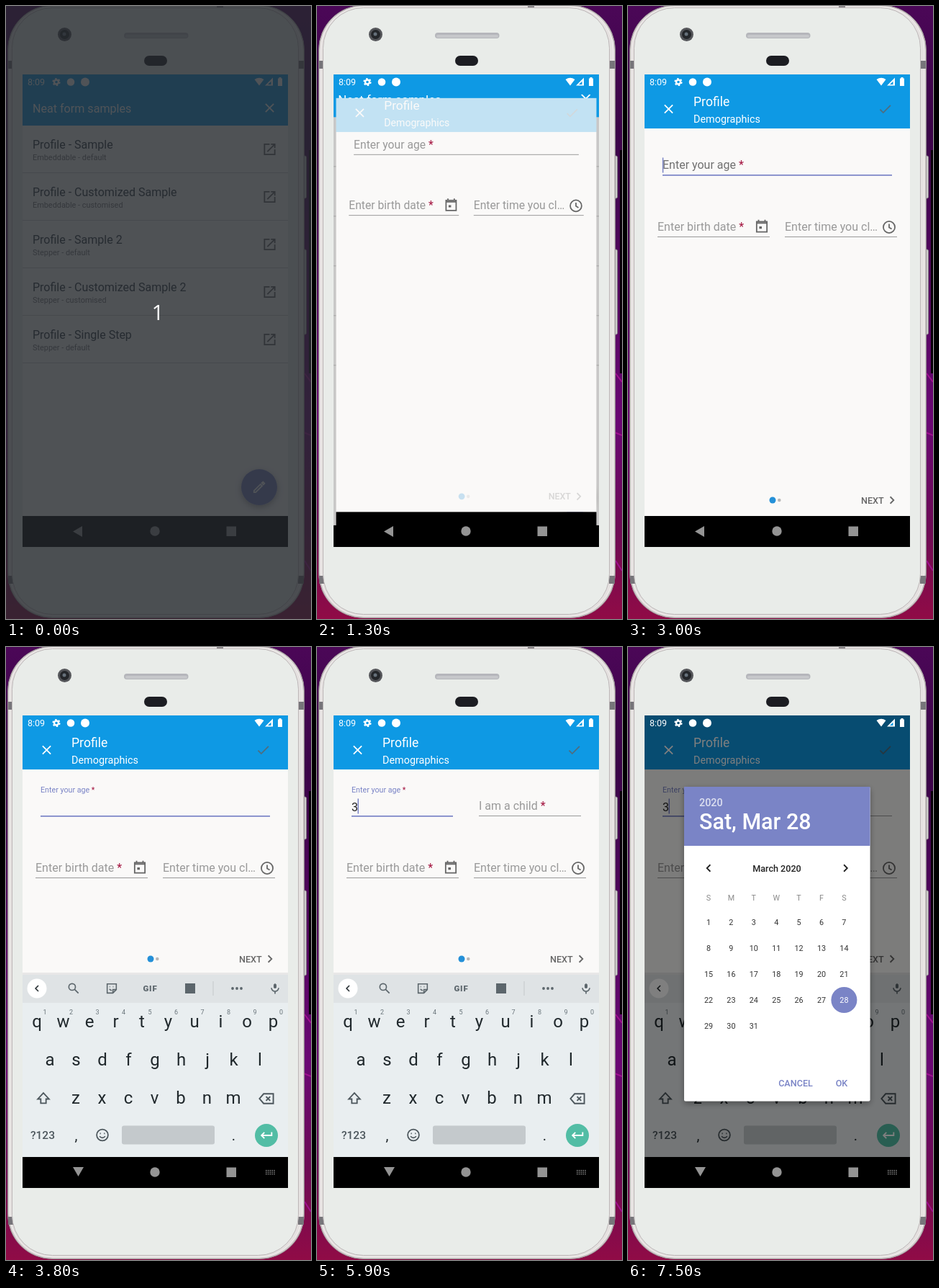
Animation, 424 px wide and 851 px high, one loop 8000 ms. Source, as an HTML page:

```html
<!DOCTYPE html>
<html lang="en">
<head>
<meta charset="utf-8">
<title>Form sample on a phone</title>
<style>
html, body { margin: 0; width: 100%; height: 100%; overflow: hidden; background: #000; }
svg { display: block; width: 424px; height: 851px; }
text { font-family: Roboto, sans-serif; white-space: pre; }
</style>
</head>
<body>
<svg id="stage" viewBox="0 0 424 851"></svg>
<script>
const BLUE = '#0e99e4', INDIGO = '#7a84c6', PAPER = '#faf9f8', GREY = '#666', HINT = '#999', STAR = '#a3133f', KEY = '#20282c';

const rect = (x, y, w, h, fill, extra = '') => `<rect x="${x}" y="${y}" width="${w}" height="${h}" fill="${fill}" ${extra}/>`;
const circle = (x, y, r, fill, extra = '') => `<circle cx="${x}" cy="${y}" r="${r}" fill="${fill}" ${extra}/>`;
const text = (s, x, y, size, fill, extra = '') => `<text x="${x}" y="${y}" font-size="${size}" fill="${fill}" ${extra}>${s}</text>`;
const centred = (s, x, y, size, fill, extra = '') => text(s, x, y, size, fill, `text-anchor="middle" ${extra}`);
const group = (id, body, extra = '') => `<g id="${id}" ${extra}>${body}</g>`;
const required = label => `${label} <tspan fill="${STAR}">*</tspan>`;
const MEDIUM = 'font-weight="500"';

// Line icons on a 24-unit grid, centred on x, y
const ICONS = {
  open: 'M12 4H4v16h16v-8M14 4h6v6M20 4L8.5 15.5',
  close: 'M5.7 5.7l12.6 12.6M18.3 5.7L5.7 18.3',
  check: 'M4.1 12.7L9 17.6L20.3 6.3',
  right: 'M9.3 6.7l5.3 5.3l-5.3 5.3',
  left: 'M14.7 6.7l-5.3 5.3l5.3 5.3',
  pencil: 'M4 20v-2.5L14 7.5l2.5 2.5L6.5 20zM16 5.5l2-1.6 2.2 2.2-1.7 2z',
  calendar: 'M4 4h16v16H4zM4 6.3h16M7 1v3M17 1v3M8 12.5h4M8 14h4',
  clock: 'M3 12a9 9 0 1 0 18 0a9 9 0 1 0-18 0M12 7v5.5l4 2.4',
  search: 'M4 9.5a5.5 5.5 0 1 0 11 0a5.5 5.5 0 1 0-11 0M14 14l6 6',
  sticker: 'M4 4h16v10l-6 6H4zM14 20v-6h6M8 9h1M14 9h1M8 13q2 3 4 2',
  mic: 'M12 4v8M10.6 5v6M13.4 5v6M6 11a6 6 0 0 0 12 0M12 17v4',
  shift: 'M12 3.5l8.5 9H16V19H8v-6.500H3.500z',
  erase: 'M8 5h14v14H8l-6-7zM11.500 9l6 6M17.500 9l-6 6',
  smile: 'M3 12a9 9 0 1 0 18 0a9 9 0 1 0-18 0M8 9.500h1.500M14.500 9.500H16M7.500 14q4.500 5 9 0',
  enter: 'M20 7v5H5M9 7.500L4.500 12L9 16.500'
};
const icon = (name, x, y, color, size = 21.5, weight = 2) =>
  `<path d="${ICONS[name]}" transform="translate(${x - size / 2} ${y - size / 2}) scale(${size / 24})" fill="none" stroke="${color}" stroke-width="${weight}"/>`;

function phone() {
  const side = (x, y) => rect(x, y, 8, 11, '#77757a');
  return rect(0, 0, 424, 851, 'url(#wall)') + rect(421, 200, 3, 310, '#080008') +
    '<path d="M415 510L424 522M414 592L424 596M415 770l9 14" stroke="#a0108f" stroke-width="2"/>' +
    rect(412, 208, 5.5, 59, '#cfcccd', 'rx="2" stroke="#8d898c"') + rect(412, 338, 5.5, 118, '#cfcccd', 'rx="2" stroke="#8d898c"') +
    rect(2.500, -1, 412, 850.500, '#d3cdcd', 'rx="62" stroke="#9a9496"') +
    rect(5, 1, 407, 846, '#e5e1e0', 'rx="60" stroke="#f6f3f2"') +
    side(3, 76) + side(406, 76) + side(3, 791) + side(406, 791) + rect(293, 0, 9, 3, '#8c888b') +
    rect(8.500, 2.500, 398, 842, '#e9ece9', 'rx="56" stroke="#bdb7b8"') +
    circle(81.500, 39.500, 9.500, '#55565a') + circle(81.500, 39.500, 6.500, '#24262a') + circle(81, 39, 2.500, '#66707a') +
    rect(164, 37, 89.500, 8, '#b5b6bb', 'rx="4"') + rect(166, 40, 86, 4, '#c6c7ca', 'rx="2"') +
    rect(192, 69, 32, 14, '#1c1d22', 'rx="7"');
}

function listPage() {
  const rows = [
    ['Sample', 'Embeddable - default'], ['Customized Sample', 'Embeddable - customised'],
    ['Sample 2', 'Stepper - default'], ['Customized Sample 2', 'Stepper - customised'], ['Single Step', 'Stepper - default']
  ];
  return rect(23, 95, 369, 613, PAPER) + rect(23, 95, 369, 71, BLUE) + rect(23, 708, 369, 43, '#000') +
    text('Neat form samples', 37, 148, 16.1, '#fff') + icon('close', 366.500, 141.500, '#fff') +
    rows.map(([name, kind], i) => {
      const y = 166 + 66 * i;
      return text('Profile - ' + name, 37, y + 32, 16, '#2b363d') + text(kind, 37, y + 48, 10.9, '#757575') +
        icon('open', 366.500, y + 33, GREY) + rect(23, y + 65, 369, 1, '#cfcfce');
    }).join('') +
    circle(352, 668, 25, INDIGO, 'filter="url(#lift)"') + icon('pencil', 352, 668, '#fff') +
    rect(23, 166, 369, 542, '#000', 'id="listDim"');
}

function formPage() {
  const bar = rect(23, 122, 369, 48, BLUE) + text('Profile', 91, 138.500, 17.6, '#fff') +
    text('Demographics', 91, 162, 14.4, '#fff') + icon('close', 56.500, 143, '#fff') + icon('check', 357.500, 143, '#4d6d80');
  const fields = text(required('Enter your age'), 48, 226, 16, HINT, 'id="age"') + rect(48, 234, 319, 1, HINT, 'id="ageLine"') +
    group('child', text(required('I am a child'), 225, 226, 16, HINT) + rect(225, 234, 142, 1, HINT)) +
    text('3', 48, 227.500, 16, '#222', 'id="digit"') + rect(48, 210.500, 1.500, 21, INDIGO, 'id="cursor"') +
    text(required('Enter birth date'), 41, 312, 16, HINT) + rect(41, 320, 156, 1, HINT) + icon('calendar', 186, 306.500, GREY) +
    text('Enter time you cl…', 218, 312, 16, HINT) + rect(218, 320, 156, 1, HINT) + icon('clock', 363, 307, GREY);
  const pager = circle(201, 686, 4.500, '#2490d8') + circle(210.300, 686, 2.300, '#b8b8b8') +
    text('NEXT', 324, 690.500, 12.600, GREY, MEDIUM) + icon('right', 367, 686, GREY);
  return rect(23, 122, 369, 586, PAPER) + rect(23, 708, 369, 43, '#000') +
    group('bar', bar) + group('fields', fields) + group('pager', pager);
}

function keyboard() {
  const row = (keys, x, y) => [...keys].map((k, i) => centred(k, x + 36.500 * i, y, 24, KEY)).join('');
  const tool = '#5c666c';
  return rect(23, 452, 369, 3, '#000', 'opacity=".07"') + rect(23, 455, 369, 39, '#dfe3e5') + rect(23, 494, 369, 214, '#e9eef0') +
    circle(43, 474, 13.500, '#fff') + icon('left', 43, 474, KEY, 18) +
    icon('search', 94, 474, tool, 20) + icon('sticker', 147, 474, tool, 19) +
    centred('GIF', 200.500, 478, 11.500, tool, 'font-weight="900" letter-spacing=".8"') +
    rect(249, 467, 14, 14, tool) + rect(287.500, 464, 1, 20, '#c5cacc') +
    [315, 321, 327].map(x => circle(x, 474, 1.900, tool)).join('') + icon('mic', 374, 474, tool, 20) +
    row('qwertyuiop', 43, 528) + row('asdfghjkl', 61, 581) + row('zxcvbnm', 97, 634) +
    [...'1234567890'].map((d, i) => centred(d, 54 + 36.500 * i, 510, 9, '#69747a')).join('') +
    icon('shift', 52, 627, '#4c565c', 22) + icon('erase', 362, 627, '#4c565c', 23) +
    text('?123', 34, 683, 15.500, '#4c565c', MEDIUM) + centred(',', 97.500, 685, 20, KEY) + icon('smile', 134, 677.500, '#4c565c', 21) +
    rect(161, 664.500, 129, 26, '#c4c9cc', 'rx="3"') + centred('.', 316.500, 685, 20, KEY) +
    circle(362, 678, 16, '#52bda5') + icon('enter', 362, 678, '#fff', 22);
}

function dialog() {
  const column = i => 112 + 31.400 * i;
  let days = '';
  for (let d = 1; d <= 31; d++) {
    const i = (d - 1) % 7, y = 386 + 36 * Math.floor((d - 1) / 7), chosen = d === 28;
    if (chosen) days += circle(column(i), y - 4, 18, INDIGO);
    days += centred(d, column(i), y, 10.800, chosen ? '#fff' : '#333');
  }
  return rect(78, 194, 258.500, 436.500, '#fff', 'rx="2" filter="url(#lift)"') + rect(78, 194, 258.500, 82, INDIGO) +
    text('2020', 99, 221, 14.400, '#dcdff0', MEDIUM) + text('Sat, Mar 28', 99, 253, 30.500, '#fff', MEDIUM) +
    icon('left', 112, 307, '#222') + centred('March 2020', 207, 311.500, 12.600, '#222', MEDIUM) + icon('right', 302.500, 307, '#222') +
    [...'SMTWTFS'].map((d, i) => centred(d, column(i), 352, 10.800, '#8a8a8a')).join('') + days +
    centred('CANCEL', 233, 610, 12.600, INDIGO, MEDIUM) + centred('OK', 297, 610, 12.600, INDIGO, MEDIUM);
}

function systemBars() {
  const soft = '#949494';
  let dots = '';
  for (let i = 0; i < 15; i++) dots += rect(361 + 2.800 * (i % 5), 726 + 2.500 * Math.floor(i / 5), 1.500, 1.300, soft);
  return text('8:09', 30, 110, 12.500, '#fff') +
    circle(70, 105.500, 3, 'none', 'stroke="#fff" stroke-width="2.400"') +
    circle(70, 105.500, 4.700, 'none', 'stroke="#fff" stroke-width="1.800" stroke-dasharray="2.460"') +
    circle(90, 105.500, 5.300, '#fff') + circle(110, 105.500, 6, '#fff') +
    '<path d="M345.500 102q6.500-4.500 13 0L352 110.500zM371 99.500V110.500H360zM378 100.500h1.500V99h3v1.500h1.500V111h-6z" fill="#fff"/>' +
    `<path d="M368.500 104.500v4.500h-4.500z" fill="${BLUE}"/>` +
    `<path id="back" d="M93 729.500L106 722v15z" fill="${soft}"/>` +
    group('down', `<path d="M93 722h15l-7.500 13z" fill="${soft}"/>` + dots) +
    circle(207, 729, 6.700, soft) + rect(306.500, 722.500, 13.500, 13.500, soft);
}

const stage = document.getElementById('stage');
stage.innerHTML = `<defs>
  <linearGradient id="wall" x2="0" y2="1"><stop stop-color="#4b0757"/><stop offset=".2" stop-color="#3b0348"/>
    <stop offset=".68" stop-color="#6b0674"/><stop offset=".85" stop-color="#6d0a55"/><stop offset="1" stop-color="#900b46"/></linearGradient>
  <filter id="lift" x="-20%" y="-20%" width="140%" height="150%"><feDropShadow dx="0" dy="3" stdDeviation="4" flood-opacity=".35"/></filter>
  <clipPath id="screen">${rect(23, 95, 369, 656, '#000')}</clipPath>
  <clipPath id="aboveNav">${rect(23, 95, 369, 613, '#000')}</clipPath></defs>` +
  phone() + group('view', group('list', listPage()) + group('form', formPage()) + rect(23, 95, 369, 27.500, BLUE) +
    `<g clip-path="url(#aboveNav)">${group('keys', keyboard())}</g>` +
    rect(23, 95, 369, 613, '#000', 'id="dim"') + group('dialog', dialog()) + systemBars(), 'clip-path="url(#screen)"') +
  group('countdown', rect(0, 0, 424, 851, '#25292d', 'opacity=".8"') +
    centred('1', 211, 436, 30, '#fff', 'style="font-family:\'Open Sans\',sans-serif"'));

const el = Object.fromEntries([...stage.querySelectorAll('[id]')].map(e => [e.id, e]));
const set = (id, attrs) => { for (const k in attrs) el[id].setAttribute(k, attrs[k]); };
const show = (id, on) => set(id, { display: on ? 'inline' : 'none' });
const progress = (t, from, to) => Math.min(1, Math.max(0, (t - from) / (to - from)));
const easeOut = p => 1 - (1 - p) ** 3;
const zoom = (s, y) => `translate(207.500 ${y}) scale(${s}) translate(-207.500 ${-y})`;

function render(t) {
  show('countdown', t < 100);

  // Page change
  const opening = t < 1300 ? 0 : 1 - 0.13 * 0.25 ** ((t - 1300) / 100);
  const fade = progress(t, 1270, 1400);
  show('list', t < 1500);
  show('form', t >= 1300);
  set('list', { transform: zoom(t < 1200 ? 1 : t < 1300 ? 1.004 : 1 + 0.052 * opening, 423) });
  set('listDim', { opacity: t < 1300 ? 0 : 0.2 });
  set('form', { transform: zoom(t >= 1500 ? 1 : 0.85 + 0.15 * opening, 423) });
  set('bar', { opacity: fade });
  set('pager', { opacity: fade, transform: `translate(0 ${t < 3200 ? 0 : -253})` });
  set('fields', { transform: `translate(0 ${t < 1400 ? -32.500 : 0})` });

  // Focus, floating label and keyboard
  const focused = t >= 3000, typed = t >= 4900, raised = t >= 3100;
  const lift = easeOut(progress(t, 3000, 3300));
  set('age', { 'font-size': 16 - 5.300 * lift, y: 226 - 24.500 * lift, fill: raised ? INDIGO : focused ? '#707070' : HINT });
  set('ageLine', { fill: focused ? INDIGO : HINT, height: focused ? 1.700 : 1, width: typed ? 141 : 319 });
  show('keys', raised);
  set('keys', { transform: `translate(0 ${256 * (1 - lift)})` });
  show('back', !raised);
  show('down', raised);

  // Typing and caret
  const caretOff = [[3800, 4500], [5400, 5900], [6400, 7000]].some(([a, b]) => t >= a && t < b);
  show('cursor', focused && !caretOff);
  set('cursor', { x: typed ? 56.500 : 47.800 });
  show('digit', typed);
  set('child', { opacity: progress(t, 5000, 5700) });

  // Date picker
  const popup = easeOut(progress(t, 7200, 7500));
  set('dim', { opacity: 0.5 * popup });
  show('dialog', popup > 0);
  set('dialog', { opacity: popup, transform: zoom(0.92 + 0.08 * popup, 412) });
}

function tick(now) {
  render(Math.floor(now % 8000 / 100) * 100);
  requestAnimationFrame(tick);
}
render(0);
requestAnimationFrame(tick);
</script>
</body>
</html>
```
